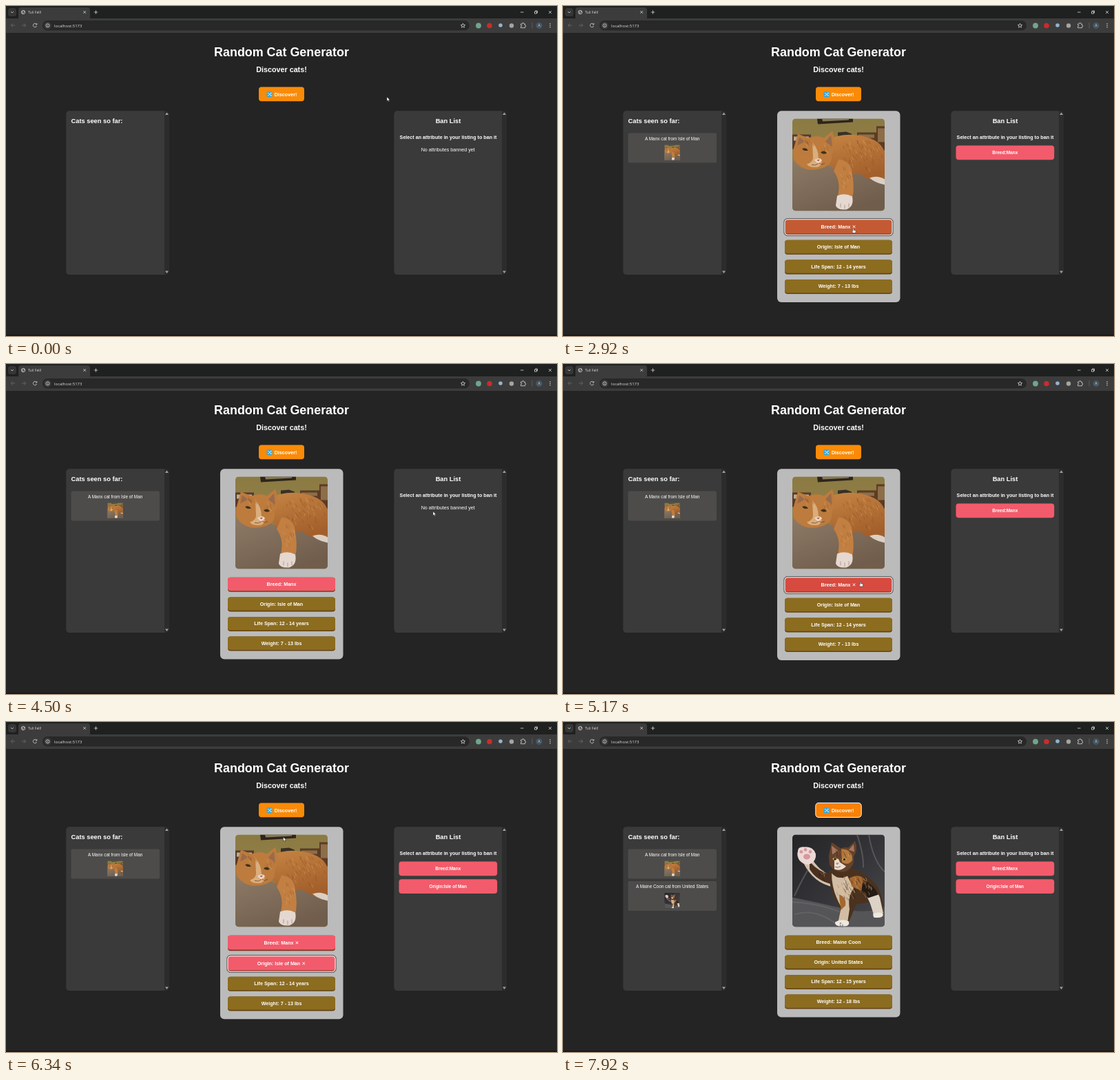
Animation, 800 px wide and 479 px high, one loop 8000 ms. Source, as an HTML page:

```html
<!DOCTYPE html>
<html lang="en">
<head>
<meta charset="utf-8">
<title>Random Cat Generator</title>
<style>
  html, body { margin: 0; width: 100%; height: 100%; overflow: hidden; background: #242424; }
  svg#stage { display: block; width: 100vw; height: 100vh; }
  text { font: 7.17px "Liberation Sans", Arial, "DejaVu Sans", sans-serif; fill: #fff; white-space: pre; }
  .bold { font-weight: 700; }
  .mid { text-anchor: middle; }
  .ui { font-family: "Open Sans", "Noto Sans", sans-serif; fill: #dedede; }
  .line { fill: none; stroke: #d6d6d6; stroke-width: .8; }
  .dim { stroke: #6d6d6d; }
</style>
</head>
<body>
<svg id="stage" viewBox="0 0 800 479" preserveAspectRatio="none">
  <defs>
    <clipPath id="photo"><rect width="134" height="134" rx="5"/></clipPath>
    <linearGradient id="wall" x2="0" y2="1">
      <stop stop-color="#8b7a42"/><stop offset="1" stop-color="#9b8750"/>
    </linearGradient>
    <linearGradient id="sofa" x2=".6" y2="1">
      <stop stop-color="#8d7a66"/><stop offset="1" stop-color="#705d4c"/>
    </linearGradient>
    <linearGradient id="coat" x2=".3" y2="1">
      <stop stop-color="#c58443"/><stop offset="1" stop-color="#a35f2b"/>
    </linearGradient>
    <linearGradient id="drape" x2="1" y2="1">
      <stop stop-color="#242426"/><stop offset=".5" stop-color="#343438"/><stop offset="1" stop-color="#4a4a4c"/>
    </linearGradient>

    <symbol id="manx" viewBox="0 0 134 134"><g clip-path="url(#photo)">
      <rect width="134" height="134" fill="url(#wall)"/>
      <path d="M36 0H88V5L37 8Z" fill="#2e2419"/><path d="M43 0H82V2L44 4Z" fill="#857a56"/>
      <path d="M0 23H27V44H0Z" fill="#5a3a27"/><path d="M2 26H24V32H2Z" fill="#b9aa90"/>
      <path d="M94 20H122V11H134V46H94Z" fill="#5b3c25"/><path d="M96 23H119V28H96ZM124 14H134V34H124Z" fill="#8d6e48"/>
      <path d="M66 20l12 -1 8 3v6H66Z" fill="#383027"/>
      <path d="M0 62Q30 54 60 72L134 80V134H0Z" fill="url(#sofa)"/>
      <path d="M50 31Q72 20 101 25Q129 31 134 49V91Q112 92 98 80Q72 84 55 69Z" fill="url(#coat)"/>
      <path d="M67 59Q86 61 87 81Q91 104 86 119L65 116Q72 93 60 76Z" fill="#c27f42"/>
      <path d="M65 112Q76 107 87 113Q90 128 78 132Q65 133 63 126Z" fill="#e4d8d1"/>
      <path d="M70 129v-6M76 131v-6M82 129v-6" stroke="#b8998b" fill="none"/>
      <path d="M112 86Q124 82 134 88V96Q121 94 112 86Z" fill="#dbcfc4"/>
      <path d="M2 43L8 22L23 28Q36 23 46 28L58 18Q65 39 57 52Q59 69 39 73Q21 78 7 66Q-2 58 2 43Z" fill="#bd7b3d"/>
      <path d="M7 39l3-12 9 6ZM48 33l8-9 2 17Z" fill="#986b4c"/>
      <path d="M29 35Q38 43 38 58Q47 64 38 70Q25 72 21 66Q31 63 30 55Z" fill="#d9ae7d"/>
      <path d="M32 60Q41 55 43 61L37 65Z" fill="#f0d9c5"/><path d="M35 60l5-1-2 3Z" fill="#a6625a"/>
      <path d="M14 44q5-3 9 2q-5 2-9-2M41 49q5-4 9 1q-5 3-9-1" fill="#3c321a"/>
      <path d="M38 65q-4 4-10 2M39 65q4 3 8 0" fill="none" stroke="#754326" stroke-width=".8"/>
      <g id="manxFur"></g>
    </g></symbol>

    <symbol id="coon" viewBox="0 0 134 134"><g clip-path="url(#photo)">
      <rect width="134" height="134" fill="url(#drape)"/>
      <path d="M0 91Q35 98 68 106Q107 117 134 105V134H0Z" fill="#555558"/>
      <path d="M0 98Q44 99 84 119M3 116Q34 106 65 131M22 52Q9 75 3 89M111 0Q117 38 134 54M94 0Q104 30 103 48" fill="none" stroke="#6c6c70" stroke-width="2" opacity=".6"/>
      <path d="M16 41L28 34Q37 51 55 59L60 76Q31 71 16 41Z" fill="#d3c1ac"/>
      <path d="M25 39Q39 55 56 58L57 72Q34 66 25 50Z" fill="#4a3020"/>
      <path d="M8 24Q8 17 18 18Q30 17 34 28Q35 37 27 42Q18 46 10 37Q6 30 8 24Z" fill="#ecd8d5"/>
      <g fill="#d697a0"><circle cx="13" cy="25" r="2.4"/><circle cx="19" cy="22" r="2.4"/><circle cx="26" cy="25" r="2.4"/><ellipse cx="21" cy="32" rx="5" ry="4"/></g>
      <path d="M53 52Q83 41 105 58Q126 72 129 89Q134 107 131 117L119 119L113 98L93 101L85 120L80 130H65L70 107Q53 85 53 52Z" fill="#4a321f"/>
      <path d="M57 56Q67 67 80 60L89 78Q80 90 83 108L80 128H66L71 105Q57 82 57 56Z" fill="#d2bda4"/>
      <path d="M83 63Q99 55 107 68L101 82L86 75ZM68 87Q79 91 77 103L70 110Z" fill="#a5682f"/>
      <path d="M103 79Q120 75 127 91L132 114L119 119L113 100Z" fill="#dcd3c6"/>
      <path d="M103 66Q119 73 125 87L110 92L100 81Z" fill="#251b15"/>
      <path d="M62 127Q72 121 82 126Q84 134 72 133Q61 133 62 127ZM117 115Q128 111 132 116Q131 122 118 120Z" fill="#eee8df"/>
      <path d="M53 31L57 11L70 20Q78 18 81 19L91 9Q96 22 89 32Q91 46 78 53Q63 57 54 44Z" fill="#65422a"/>
      <path d="M57 16l9 7-8 6ZM82 22l7-8 1 11Z" fill="#a57761"/>
      <path d="M71 21Q88 21 87 37Q81 46 72 40Z" fill="#b67b40"/>
      <path d="M61 38Q66 31 69 40L78 46Q70 54 61 50Z" fill="#eadfd1"/>
      <path d="M58 35q4-3 7 1q-4 3-7-1M72 36q4-4 7 0q-3 4-7 0" fill="#b9a750"/>
      <circle cx="62" cy="35.5" r="1.4" fill="#15120d"/><circle cx="75.5" cy="36" r="1.5" fill="#15120d"/>
      <path d="M63 41h5l-3 3Z" fill="#b97b72"/><path d="M62 47q4 2 8-1" fill="none" stroke="#6d4539" stroke-width=".8"/>
      <g id="coonFur"></g>
    </g></symbol>
  </defs>

  <rect width="800" height="479" fill="#242424"/>

  <!-- Browser chrome -->
  <rect width="800" height="24" fill="#1f2020"/>
  <rect y="18" width="800" height="21" fill="#3c3c3c"/>
  <rect x="18" y="2" width="104" height="20" rx="4" fill="#3c3c3c"/>
  <rect x="3" y="3" width="12" height="12" rx="3.5" fill="#363636"/>
  <rect x="53" y="21" width="620" height="14.5" rx="7.2" fill="#282828"/>
  <path class="line" d="M7 8l2 2 2-2M112.300 7.100l3.700 3.700m0-3.700l-3.700 3.700M127.800 9h5.400m-2.700-2.700v5.400M747 9h4.500M788 7l4 4m0-4l-4 4M767.500 8h3v3h-3zM768.500 8V7h3v3h-1"/>
  <circle class="line" cx="25" cy="9" r="2.700"/><path class="line" d="M23 8l2 1-1 2m2-4l1 2"/>
  <path class="line dim" d="M13 28H7.500m2.500-2.700L7.300 28l2.700 2.700M23 28h5.500m-2.500-2.700l2.700 2.700-2.700 2.700"/>
  <path class="line" d="M44.300 26.500A2.700 2.700 0 1 0 44.600 29M44.800 25v2h-2"/>
  <circle cx="60.500" cy="28.300" r="5.200" fill="#3c3c3c"/>
  <circle class="line" cx="60.500" cy="28.300" r="2.500"/><path class="line" d="M60.500 28v1.600m0-3v.700"/>
  <path class="line" d="M663.500 25.300l.9 2 2.200.2-1.700 1.500.5 2.200-1.900-1.200-1.900 1.200.5-2.200-1.700-1.500 2.200-.2z"/>
  <circle cx="686" cy="28.500" r="3.900" fill="#6fa68c"/><circle cx="702" cy="28.500" r="3.800" fill="#c92c2c"/>
  <circle cx="718" cy="28" r="2.800" fill="#91b5cd"/><circle cx="734" cy="28.500" r="3.200" fill="#a5a5a0"/>
  <path class="line" d="M747.500 26h2q0-1.700 1.200-1.700t1.200 1.700h1.600v2q1.300 0 1.300 1.100t-1.300 1.100v1.500h-6v-2q1.300 0 1.300-1t-1.300-1z"/>
  <path d="M764 24v8.500" stroke="#5b5b5b"/>
  <circle cx="774" cy="28.500" r="4.700" fill="#435765"/>
  <text class="ui mid" x="774" y="30.300" style="font-size:5px">A</text>
  <g fill="#d6d6d6"><circle cx="790" cy="25.800" r=".75"/><circle cx="790" cy="28.300" r=".75"/><circle cx="790" cy="30.800" r=".75"/></g>
  <text class="ui" x="32" y="10.900" style="font-size:5.200px">Tuli Feli!</text>
  <text class="ui" x="70" y="30.500" style="font-size:6px">localhost:5173</text>
  <rect y="477" width="800" height="2" fill="#1b1719"/>

  <!-- Page -->
  <text class="bold mid" x="400" y="72.500" style="font-size:17.900px">Random Cat Generator</text>
  <text class="bold mid" x="400" y="95.500" style="font-size:10.750px">Discover cats!</text>
  <g id="panels"></g>
  <text class="bold" x="94.500" y="169.600" style="font-size:9.300px">Cats seen so far:</text>
  <text class="bold mid" x="642" y="169.600" style="font-size:9.300px">Ban List</text>
  <text class="bold mid" x="642" y="192.600">Select an attribute in your listing to ban it</text>
  <g id="live"></g>
</svg>

<script>
const LOOP = 8000, FADE = 250;
const OLIVE = [140, 108, 31], OLIVE_HOVER = [165, 116, 32];
const RED = [242, 91, 107], RED_HOVER = [231, 61, 72];
const ORANGE = [249, 139, 8], ORANGE_HOVER = [245, 104, 2];

// Moments of the clicks and of the answers to them
const T = { discover: 1000, manx: 1750, breed: 2800, origin: 3420, freeOrigin: 4100,
            freeBreed: 4500, breed2: 5000, origin2: 5900, discover2: 6750, coon: 7000 };

const cats = [
  { id: 'manx', title: 'A Manx cat from Isle of Man', from: T.manx,
    rows: ['Breed: Manx', 'Origin: Isle of Man', 'Life Span: 12 - 14 years', 'Weight: 7 - 13 lbs'] },
  { id: 'coon', title: 'A Maine Coon cat from United States', from: T.coon,
    rows: ['Breed: Maine Coon', 'Origin: United States', 'Life Span: 12 - 15 years', 'Weight: 12 - 18 lbs'] }
];

const pointerPath = [
  [0, 553, 132], [150, 553, 132], [900, 408, 134], [1920, 404.5, 137], [2450, 421, 322],
  [2950, 421.5, 322.5], [3300, 428, 352], [3480, 429, 352], [3840, 577.5, 262], [4050, 612, 240],
  [4150, 612, 240], [4400, 620, 214], [4550, 620, 214], [4950, 432, 316], [5200, 432, 316],
  [5650, 425, 350], [5950, 425, 350], [6340, 402.5, 167], [6550, 402, 132], [7650, 402, 134],
  [7920, 402.5, 291], [8000, 402.5, 300]
];

const discoverFades = [[0, ORANGE], [780, ORANGE_HOVER], [2060, ORANGE], [6450, ORANGE_HOVER], [7760, ORANGE]];
const rowFades = [
  [[0, OLIVE], [2380, OLIVE_HOVER], [T.breed, RED_HOVER], [3100, RED], [T.freeBreed, OLIVE],
   [4820, OLIVE_HOVER], [T.breed2, RED_HOVER], [5420, RED], [T.coon - FADE, RED], [T.coon, OLIVE]],
  [[0, OLIVE], [3180, OLIVE_HOVER], [T.origin, RED_HOVER], [3540, RED], [T.freeOrigin, OLIVE],
   [5500, OLIVE_HOVER], [T.origin2, RED_HOVER], [6010, RED], [T.coon - FADE, RED], [T.coon, OLIVE]]
];

const $ = id => document.getElementById(id);
const within = (t, ...spans) => spans.some(([a, b]) => t >= a && t < b);
const smooth = k => k * k * (3 - 2 * k);
const rgb = c => `rgb(${c.map(Math.round)})`;
const rect = (x, y, w, h, r, fill, extra = '') =>
  `<rect x="${x}" y="${y}" width="${w}" height="${h}" rx="${r}" fill="${fill}" ${extra}/>`;
const label = (x, y, str, size = 7.17, cls = 'bold mid') =>
  `<text class="${cls}" x="${x}" y="${y}" style="font-size:${size}px">${str}</text>`;
const picture = (id, x, y, size) => `<use href="#${id}" x="${x}" y="${y}" width="${size}" height="${size}"/>`;

function fade(t, steps) {
  let i = steps.length - 1;
  while (i && t < steps[i][0]) i--;
  const to = steps[i][1], from = i ? steps[i - 1][1] : to;
  const k = smooth(Math.min(1, (t - steps[i][0]) / FADE));
  return rgb(to.map((v, n) => from[n] + (v - from[n]) * k));
}

function pointerAt(t) {
  const i = Math.max(1, pointerPath.findIndex(p => p[0] > t));
  const [t0, x0, y0] = pointerPath[i - 1], [t1, x1, y1] = pointerPath[i];
  const k = smooth((t - t0) / (t1 - t0));
  return [x0 + (x1 - x0) * k, y0 + (y1 - y0) * k];
}

function focusRing(x, y, w, h) {
  return rect(x - 1, y - 1, w + 2, h + 2, 4.5, 'none', 'stroke="#262626" stroke-width=".9"') +
         rect(x, y, w, h, 4, 'none', 'stroke="#fff" stroke-width="1"');
}

function discoverButton(t) {
  const focused = within(t, [T.discover, T.breed], [T.discover2, LOOP]);
  return rect(367, 117.6, 66, 20.6, 4, fade(t, discoverFades)) +
    (focused ? rect(366.8, 117.4, 66.4, 21, 4.2, 'none', 'stroke="#fff" stroke-width="1"') : '') +
    rect(378.5, 124.2, 8, 8, 1.5, '#38a5d8') +
    '<path d="M379.800 126.500h1.500l3 3.500h1.200M379.800 130h1.500l3-3.500h1.200m-1-1l1 1-1 1m0 1.500l1 1-1 1" fill="none" stroke="#e5f5fb" stroke-width=".8"/>' +
    label(406, 130.7, 'Discover!');
}

function card(t, cat, banned, hits) {
  const rowPitch = 28.6, extra = 1.4;
  const focus = within(t, [T.breed, T.origin], [T.breed2, T.origin2]) ? 0
    : within(t, [T.origin, T.freeOrigin], [T.origin2, T.discover2]) ? 1 : -1;
  let y = 309.8, rows = '';
  cat.rows.forEach((str, i) => {
    const isBanned = cat.id === 'manx' && banned[i];
    const h = isBanned ? 22.4 : 21;
    rows += rect(322, y, 156, h, 4, isBanned ? '#803523' : '#654312') +
      rect(322, y, 156, h - 1.6, 4, i < 2 ? fade(t, rowFades[i]) : rgb(OLIVE)) +
      label(400, y + (isBanned ? 13.4 : 12.3), str + (isBanned ? ' ✕' : '')) +
      (focus === i ? focusRing(322, y, 156, h) : '');
    hits.push([322, y, 156, h]);
    y += rowPitch + (isBanned ? extra : 0);
  });
  return rect(311, 152.2, 178.5, y - 424.2 + 276.3, 6, '#bbb') + picture(cat.id, 333, 163.4, 134) + rows;
}

function seenList(t) {
  return cats.filter(c => t >= c.from).map((c, i) => {
    const y = 184.5 + i * 46.5;
    return rect(94.5, y, 128.5, 43, 2, '#4d4c4b') +
      label(158.7, y + 10.4, c.title, 6.4, 'mid') + picture(c.id, 147.3, y + 17, 22.5);
  }).join('');
}

function banList(banned, hits) {
  const items = ['Breed:Manx', 'Origin:Isle of Man'].filter((_, i) => banned[i]);
  if (!items.length) return label(641.7, 210.6, 'No attributes banned yet', 7.17, 'mid');
  return items.map((str, i) => {
    const y = 202.6 + i * 25.7;
    hits.push([570.5, y, 142.7, 20.6]);
    return rect(570.5, y, 142.7, 20.6, 4, rgb(RED)) + label(641.8, y + 12.4, str, 6.45);
  }).join('');
}

function pointer(x, y, hits) {
  const hand = hits.some(([l, top, w, h]) => x >= l && x <= l + w && y >= top && y <= top + h);
  const shape = hand
    ? 'M-.700 .500Q0-.500 .700 .500V2.700L2.900 3.200Q3.900 3.500 3.700 4.600L3.100 7H-.300L-2.200 4.500Q-1.800 3.500-.700 4.300Z'
    : 'M0 0V5.900L1.400 4.700 2.400 6.800 3.400 6.300 2.500 4.300H4.300Z';
  return `<path transform="translate(${x.toFixed(2)} ${y.toFixed(2)})" d="${shape}" fill="#fff" stroke="#222" stroke-width=".5"/>`;
}

function scene(t) {
  const banned = [
    within(t, [T.breed, T.freeBreed], [T.breed2, LOOP]),
    within(t, [T.origin, T.freeOrigin], [T.origin2, LOOP])
  ];
  const hits = [[367, 117.6, 66, 20.6]];
  const cat = cats.filter(c => t >= c.from).pop();
  return discoverButton(t) + seenList(t) + (cat ? card(t, cat, banned, hits) : '') +
    banList(banned, hits) + pointer(...pointerAt(t), hits);
}

function panel(x, w) {
  const bar = x + w - 7, mid = bar + 3.5;
  return rect(x, 152.2, w, 237.8, 5, '#2c2c2c') +
    `<path d="M${bar} 152.200H${x + 5}q-5 0-5 5V385q0 5 5 5H${bar}Z" fill="#3a3a3a"/>` +
    `<path d="M${mid - 2.5} 158h5l-2.500-3.500zM${mid - 2.5} 384.500h5l-2.500 3.500z" fill="#a0a0a0"/>`;
}

function fur(seed, colours, patches) {
  const random = () => (seed = (seed * 16807) % 2147483647) / 2147483647;
  return patches.map(([cx, cy, rx, ry, count]) => Array.from({ length: count }, () => {
    const a = random() * 2 * Math.PI, r = Math.sqrt(random());
    const x = cx + rx * r * Math.cos(a), y = cy + ry * r * Math.sin(a);
    const colour = colours[Math.floor(random() * colours.length)];
    return `<path d="M${x.toFixed(1)} ${y.toFixed(1)}q2 1 ${(1 + random() * 3).toFixed(1)} 5" fill="none" stroke="${colour}" opacity=".45"/>`;
  }).join('')).join('');
}

$('panels').innerHTML = panel(87.3, 149.700) + panel(563.5, 163.5);
$('manxFur').innerHTML = fur(7, ['#8b4d21', '#dba467', '#a2642f'],
  [[98, 52, 32, 22, 65], [76, 87, 9, 19, 18], [19, 34, 12, 6, 12], [48, 42, 7, 10, 10]]);
$('coonFur').innerHTML = fur(11, ['#1d1712', '#a76d37', '#d2b48c'],
  [[94, 75, 22, 15, 60], [72, 27, 13, 7, 18], [72, 82, 9, 24, 22], [43, 57, 8, 6, 8]]);

let last = '';
function frame() {
  const markup = scene(performance.now() % LOOP);
  if (markup !== last) $('live').innerHTML = last = markup;
  requestAnimationFrame(frame);
}
frame();
</script>
</body>
</html>
```
